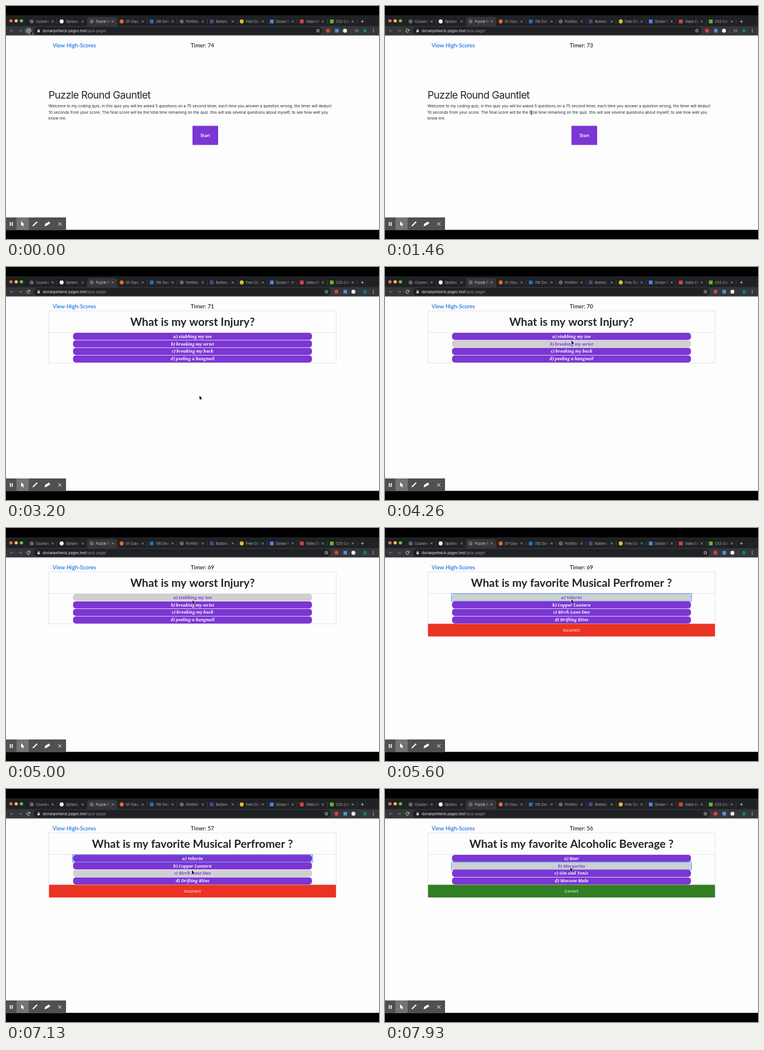
Write an HTML page with a canvas that moves like this. It is 640 px wide and 400 px high and loops after 8 s.

```html
<!DOCTYPE html>
<html lang="en">
<head>
<meta charset="utf-8">
<title>Quiz</title>
<style>
html, body { margin: 0; width: 100%; height: 100%; overflow: hidden; background: #000; }
canvas { display: block; width: 640px; height: 400px; }
</style>
</head>
<body>
<canvas id="stage"></canvas>
<script>
const canvas = document.getElementById('stage');
const dpr = window.devicePixelRatio || 1;
canvas.width = 640 * dpr;
canvas.height = 400 * dpr;
const c = canvas.getContext('2d');

const LOOP = 8000;
const START = 2400, ANSWER_1 = 5600, ANSWER_2 = 7660;
const ICONS_SHIFT = 1950;
const UI = 'Inter, "Open Sans", sans-serif';
const ROUND = 'Lato, sans-serif';
const SERIF = '"Noto Serif", serif';
const PURPLE = '#7c36d3';

const questions = [
  { title: 'What is my worst Injury?',
    options: ['a) stubbing my toe', 'b) breaking my wrist', 'c) breaking my back', 'd) peeling a hangnail'] },
  { title: 'What is my favorite Musical Perfromer ?', focus: 0, verdict: 'Incorrect', tone: '#ea3323',
    options: ['a) Velorin', 'b) Copper Lantern', 'c) Birch Lane Duo', 'd) Drifting Kites'] },
  { title: 'What is my favorite Alcoholic Beverage ?', focus: 1, verdict: 'Correct', tone: '#327e22',
    options: ['a) Beer', 'b) Margarita', 'c) Gin and Tonic', 'd) Moscow Mule'] }
];

const intro = [
  'Welcome to my coding quiz, in this quiz you will be asked 5 questions on a 75 second timer, each time you answer a question wrong, the timer will deduct',
  '10 seconds from your score. The final score will be the total time remaining on the quiz. this will ask several questions about myself, to see how well you',
  'know me.'
];

// label, icon shape, icon colour
const tabs = [
  ['Coursewo', 'globe'], ['Options', 'dot', '#f4f4f4'], ['Puzzle Ro', 'globe'],
  ['01-Class-', 'dot', '#e8682c'], ['(18) Dori', 'box', '#2a6fb5'], ['Portfolio', 'globe'],
  ['Buttons', 'box', '#5b3f8c'], ['Free Clou', 'dot', '#e6b93c'], ['Dorian P', 'box', '#4a86e8'],
  ['Video De', 'box', '#d8453f'], ['CSS Com', 'box', '#62b82e']
];

// time, x, y of the pointer tip
const path = [
  [0, 42, 43.5], [150, 42, 43.5], [1150, 251, 183], [1520, 251, 183], [2150, 340, 224],
  [2600, 339, 237], [3080, 332, 221], [3380, 332, 221], [4050, 320, 126.2], [4700, 320, 126.2],
  [5250, 320, 122.8], [6100, 320, 122.8], [6900, 319, 139.6], [7180, 319, 139.6],
  [7500, 318, 135], [8000, 318, 135]
];

function rect(x, y, w, h, color) {
  c.fillStyle = color;
  c.fillRect(x, y, w, h);
}

function pill(x, y, w, h, r, color) {
  c.fillStyle = color;
  c.beginPath();
  c.roundRect(x, y, w, h, r);
  c.fill();
}

function dot(x, y, r, color) {
  c.fillStyle = color;
  c.beginPath();
  c.arc(x, y, r, 0, Math.PI * 2);
  c.fill();
}

function line(points, color, width = 1) {
  c.strokeStyle = color;
  c.lineWidth = width;
  c.beginPath();
  for (let i = 0; i < points.length; i += 2) c.lineTo(points[i], points[i + 1]);
  c.stroke();
}

function shape(points, color) {
  c.fillStyle = color;
  c.beginPath();
  for (let i = 0; i < points.length; i += 2) c.lineTo(points[i], points[i + 1]);
  c.closePath();
  c.fill();
}

function text(str, x, y, font, color, align = 'left', spacing = 0) {
  c.font = font;
  c.fillStyle = color;
  c.textAlign = align;
  c.letterSpacing = spacing + 'px';
  c.fillText(str, x, y);
}

function cross(x, y, r, color, width) {
  line([x - r, y - r, x + r, y + r], color, width);
  line([x + r, y - r, x - r, y + r], color, width);
}

function pointerAt(t) {
  let i = 1;
  while (i < path.length - 1 && path[i][0] < t) i++;
  const [t0, x0, y0] = path[i - 1], [t1, x1, y1] = path[i];
  const k = Math.min(1, (t - t0) / (t1 - t0));
  const e = k * k * (3 - 2 * k);
  return { x: x0 + (x1 - x0) * e, y: y0 + (y1 - y0) * e };
}

function drawTabs() {
  rect(0, 16, 640, 20, '#202124');
  ['#ed6a5e', '#f5bf4f', '#61c554'].forEach((color, i) => dot(8.5 + i * 9, 25.5, 2.8, color));
  pill(139, 19, 52, 20, 4, '#35363a');
  tabs.forEach(([label, kind, color], i) => {
    const x = 44 + i * 51.5, active = i === 2;
    const back = active ? '#35363a' : '#202124';
    if (kind === 'globe') {
      dot(x, 26.5, 3.3, '#74777b');
      line([x - 2, 25, x, 26.5, x - 1, 28.5], '#3a3c40', 1);
      line([x + 1, 24.5, x + 2.2, 26.5], '#3a3c40', 0.9);
    } else if (kind === 'dot') dot(x, 26.5, 3.4, color);
    else rect(x - 3.2, 23.3, 6.4, 6.4, color);
    text(label, x + 7.2, 28.6, '5.7px ' + UI, active ? '#dcdde0' : '#b4b7bb');
    const fade = c.createLinearGradient(x + 24, 0, x + 32, 0);
    fade.addColorStop(0, back + '00');
    fade.addColorStop(1, back);
    rect(x + 24, 21, 16, 12, fade);
    cross(x + 36, 26.5, 1.7, '#b9bbbf', 0.8);
    if (i !== 1 && !active) rect(x + 43.5, 22, 0.6, 9, '#4b4d51');
  });
  line([609, 26.5, 614, 26.5], '#c4c6c9', 0.9);
  line([611.5, 24, 611.5, 29], '#c4c6c9', 0.9);
}

function drawStar(x, y) {
  c.strokeStyle = '#c8cacd';
  c.lineWidth = 0.8;
  c.beginPath();
  for (let i = 0; i < 10; i++) {
    const a = i * Math.PI / 5 - Math.PI / 2, r = i % 2 ? 1.4 : 3.2;
    c.lineTo(x + r * Math.cos(a), y + r * Math.sin(a));
  }
  c.closePath();
  c.stroke();
}

function drawToolbar(t, p) {
  const shifted = t >= ICONS_SHIFT, dx = shifted ? 14.5 : 0;
  rect(0, 34.5, 640, 16, '#35363a');
  pill(47.5, 36, 495 + dx, 13, 6.5, '#202124');
  line([13, 42.5, 7.5, 42.5], '#74777b', 0.9);
  line([10, 40, 7.5, 42.5, 10, 45], '#74777b', 0.9);
  line([21.5, 42.5, 27, 42.5], '#74777b', 0.9);
  line([24.5, 40, 27, 42.5, 24.5, 45], '#74777b', 0.9);
  if (Math.hypot(p.x - 38.5, p.y - 42.5) < 7) dot(38.5, 42.5, 6.3, '#5a5b5f');
  c.strokeStyle = '#e1e2e4';
  c.lineWidth = 1;
  c.beginPath();
  c.arc(38.5, 42.5, 2.6, 0.5, Math.PI * 1.75);
  c.stroke();
  shape([41.7, 39.4, 41.7, 42.2, 38.9, 42.2], '#e1e2e4');

  rect(54, 41.7, 4, 3.4, '#c8cacd');
  line([54.9, 42, 54.9, 40, 57.1, 40, 57.1, 42], '#c8cacd', 0.7);
  text('dorianpellwick.pages.test', 63, 44.7, '6.2px ' + UI, '#eceded');
  const w = c.measureText('dorianpellwick.pages.test').width;
  text('/quiz-page/', 63 + w, 44.7, '6.2px ' + UI, '#989ba0');

  drawStar(535.2 + dx, 42.4);
  dot(552.5 + dx, 42.4, 3.3, '#d8413e');
  rect(564.5 + dx, 39.3, 6.2, 6.2, '#5b8bd8');
  dot(581.6 + dx, 42.4, 3.4, '#ededed');
  if (!shifted) {
    rect(591.5, 38, 0.7, 9, '#55575b');
    for (let i = 0; i < 3; i++) rect(598, 40 + i * 2, i < 2 ? 6.5 : 4, 0.8, '#8d9094');
    rect(604, 42, 0.8, 3, '#8d9094');
  }
  dot(616, 42.4, 5, '#0d4b4d');
  text('D', 616, 44.5, '5.6px ' + UI, '#b9d6d4', 'center');
  for (let i = 0; i < 3; i++) dot(630.2, 40 + i * 2.4, 0.75, '#d4d5d7');
}

function drawIntro() {
  text('Puzzle Round Gauntlet', 73, 159, '17.5px ' + UI, '#212529', 'left', -0.6);
  intro.forEach((row, i) => text(row, 73, 174 + i * 10.7, '6.7px ' + UI, '#212529'));
  rect(320, 205.7, 44, 32.8, PURPLE);
  text('Start', 342, 224.7, 'bold 7.7px ' + ROUND, '#fff', 'center');
}

function drawQuestion(q, p) {
  c.strokeStyle = '#dedede';
  c.lineWidth = 0.8;
  c.strokeRect(73.5, 75.2, 493, 89.3);
  line([73.5, 112.4, 566.5, 112.4], '#dedede', 0.8);
  text(q.title, 320, 100.7, 'bold 19.3px ' + ROUND, '#212529', 'center');
  if (q.verdict) {
    pill(73.7, 164.6, 492.6, 21.6, 1.2, q.tone);
    text(q.verdict, 320, 178, '6.7px ' + UI, '#fff', 'center');
  }
  q.options.forEach((label, i) => {
    const y = 113 + i * 12.9;
    const hover = p.y >= y && p.y < y + 12.9;
    pill(115, y, 410, 12.2, 5, hover ? '#d0d0d0' : PURPLE);
    text(label, 320, y + 8.6, 'italic bold 7px ' + SERIF, hover ? '#7340d2' : '#fff', 'center');
    if (q.focus === i) {
      c.strokeStyle = '#68a5ee';
      c.lineWidth = 1.4;
      c.strokeRect(114.2, y - 0.4, 411.6, 13);
    }
  });
}

function timerValue(t) {
  const ticks = Math.floor((t + 250) / 1000);
  return 74 - ticks - (ticks >= 6 ? 10 : 0);
}

function drawRecorder() {
  rect(0, 363, 103, 21.3, '#505050');
  rect(18, 363, 21, 21.3, '#747474');
  rect(6.6, 371, 1.7, 6.5, '#fff');
  rect(9.8, 371, 1.7, 6.5, '#fff');
  shape([26, 369.5, 26, 377.2, 27.8, 375.8, 29.2, 378.6, 30.5, 378, 29.2, 375.2, 31.4, 375], '#fff');
  line([47, 376.8, 52, 371.8], '#fff', 2.2);
  shape([45.5, 378.3, 46, 375.8, 48, 377.8], '#fff');
  dot(52.6, 371.2, 1.2, '#fff');
  shape([66.3, 378.2, 67.3, 373.8, 74, 370, 75.8, 373.2, 69.5, 377.2], '#fff');
  cross(92.3, 374.2, 2.8, '#fff', 1);
}

function drawPointer(p, overText) {
  if (overText) {
    line([p.x, p.y - 3, p.x, p.y + 3], '#111', 0.8);
    line([p.x - 1.4, p.y - 3.2, p.x + 1.4, p.y - 3.2], '#111', 0.7);
    line([p.x - 1.4, p.y + 3.2, p.x + 1.4, p.y + 3.2], '#111', 0.7);
    return;
  }
  c.save();
  c.translate(p.x, p.y);
  const arrow = [0, 0, 0, 6.4, 1.5, 5.1, 2.5, 7.4, 3.5, 7, 2.5, 4.7, 4.5, 4.6];
  line([...arrow, 0, 0], '#fff', 0.9);
  shape(arrow, '#0a0a0a');
  c.restore();
}

function draw(t) {
  const p = pointerAt(t);
  const onIntro = t < START;
  c.setTransform(dpr, 0, 0, dpr, 0, 0);
  rect(0, 0, 640, 400, '#000');
  drawTabs();
  drawToolbar(t, p);
  rect(0, 50.5, 640, 333.8, '#fdfdfd');
  text('View High-Scores', 80, 71.2, '500 9.5px ' + ROUND, '#0a6bdd');
  text('Timer: ' + timerValue(t), 317, 71.2, '500 9.5px ' + ROUND, '#111');
  if (onIntro) drawIntro();
  else drawQuestion(questions[t < ANSWER_1 ? 0 : t < ANSWER_2 ? 1 : 2], p);
  drawRecorder();
  drawPointer(p, onIntro && p.x > 73 && p.y > 144 && p.y < 199);
}

const begin = performance.now();
function loop() {
  draw((performance.now() - begin) % LOOP);
  requestAnimationFrame(loop);
}
loop();
</script>
</body>
</html>
```
